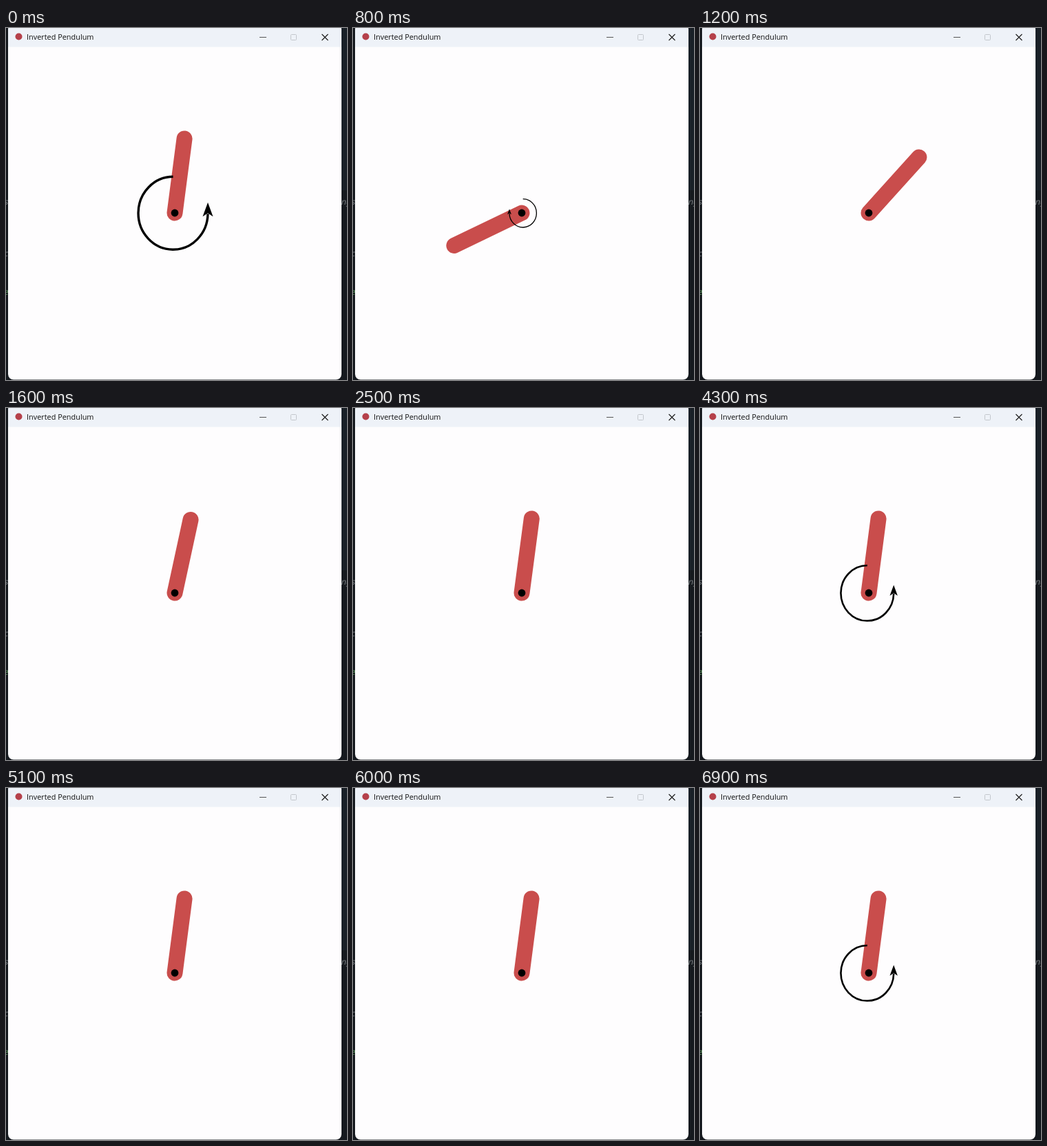
Write an HTML page that moves like this. It is 495x512 px and loops after 7 s.

```html
<!DOCTYPE html>
<html lang="en">
<head>
<meta charset="utf-8">
<title>Inverted Pendulum</title>
<style>
  html, body { margin: 0; width: 100%; height: 100%; overflow: hidden; background: #15191e; }
  svg { display: block; width: 495px; height: 512px; }
  .title { font: 10.9px "Open Sans", "Noto Sans", sans-serif; fill: #111; }
  .code { font: italic 12px "Noto Sans Mono", monospace; fill: #777c80; }
</style>
</head>
<body>
<svg viewBox="0 0 495 512">
  <defs>
    <clipPath id="frame"><rect x="3" y="-5" width="484" height="516.5" rx="8"/></clipPath>
  </defs>

  <!-- editor behind the window -->
  <rect width="495" height="512" fill="#15191e"/>
  <rect x="487" width="8" height="236" fill="#192027"/>
  <g class="code">
    <text x="-4" y="257">s</text>
    <text x="-4" y="332">c</text>
    <text x="-4" y="388" fill="#5c9a5c" style="fill:#5c9a5c">e</text>
    <text x="486" y="257">ng</text>
  </g>

  <!-- window -->
  <g clip-path="url(#frame)">
    <rect width="495" height="512" fill="#fefdfe"/>
    <rect width="495" height="27.5" fill="#eef2f8"/>
  </g>
  <circle cx="18.5" cy="12.5" r="5" fill="#b5404a"/>
  <text class="title" x="30" y="17">Inverted Pendulum</text>
  <g fill="none">
    <path d="M368 13.5h10" stroke="#555"/>
    <rect x="413.5" y="9.5" width="8" height="8" rx="1" stroke="#c3c7cc"/>
    <path d="M458.5 9l9 9m0-9l-9 9" stroke="#222" stroke-width="1.2"/>
  </g>

  <!-- pendulum -->
  <line id="rod" x1="245" y1="269" x2="245" y2="160" stroke="#c94d4c" stroke-width="23" stroke-linecap="round"/>
  <g id="torque">
    <path d="M0-53A50.5 53 0 1 0 50.5 1" fill="none" stroke="#000" stroke-width="3.4"/>
    <path d="M50.5-15.5L58 5L50.5 0L43 5z"/>
  </g>
  <circle cx="245" cy="269" r="5.4"/>
</svg>

<script>
const STEP = 100, LOOP = 7000, REST = 7.4;
const rod = document.getElementById('rod');
const torque = document.getElementById('torque');

// Degrees clockwise from upright, one per step: fall left, swing through, catch.
const swing = [7.4, 7, 5, 0, -9, -26, -52, -83, -115.8, -176, -250, -288, -318, -333, -341, -345, -347.8];

// Torque pulses by step: positive turns counter-clockwise.
const pulses = {
  0: 1, 1: 1, 2: 1, 3: 1, 4: 1, 5: 1, 8: -.39,
  19: 1, 22: .76, 28: 1, 32: .6, 39: 1, 43: .76, 47: 1, 54: .76, 58: 1, 62: .76, 69: .76
};

function angleAt(i) {
  if (i < swing.length) return swing[i];
  return REST + 4.8 * Math.exp(-(i - 16) / 2.5);
}

function draw(now) {
  const i = Math.floor((now % LOOP) / STEP);
  rod.setAttribute('transform', `rotate(${angleAt(i)} 245 269)`);

  const u = pulses[i] || 0, size = Math.abs(u);
  const x = 245 - Math.sign(u) * (1.2 + 1.3 * size);
  torque.setAttribute('visibility', u ? 'visible' : 'hidden');
  torque.setAttribute('transform', `translate(${x} 269.3) scale(${u || 1} ${size || 1})`);
}

let start;
function tick(now) {
  start ??= now;
  draw(now - start);
  requestAnimationFrame(tick);
}
draw(0);
requestAnimationFrame(tick);
</script>
</body>
</html>
```
